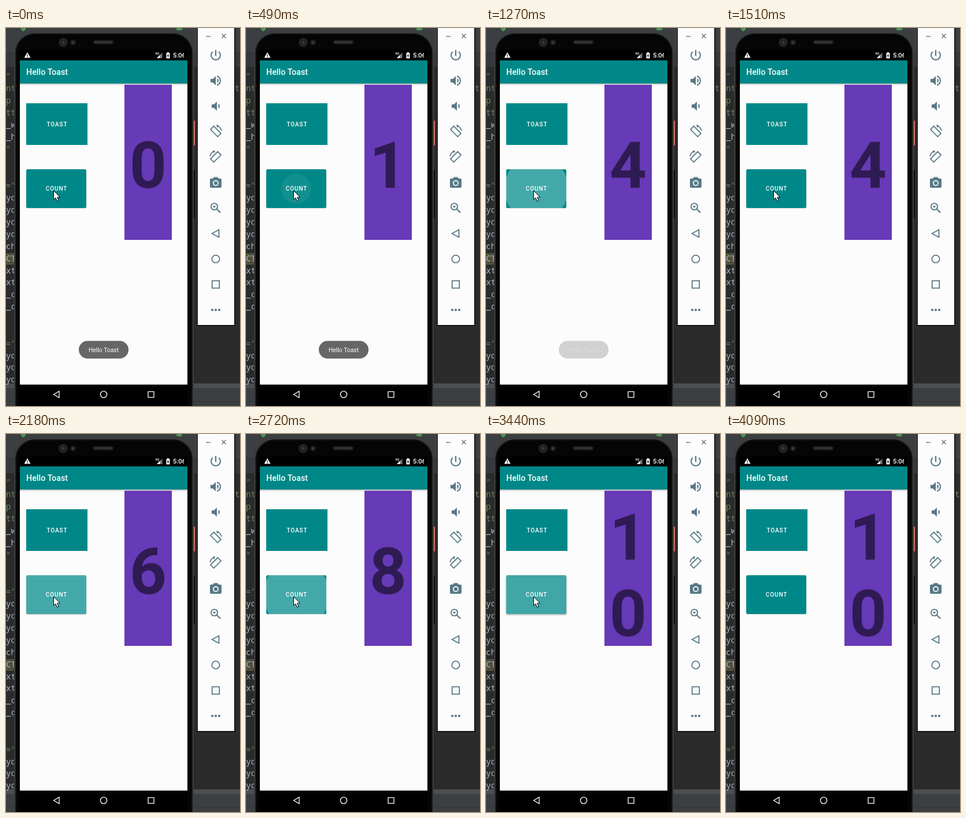
An HTML page with a canvas that plays this animation: 405 by 653 pixels, repeating every 4.52 s.

```html
<!DOCTYPE html>
<html lang="en">
<head>
<meta charset="utf-8">
<title>Counter app</title>
<style>
  html, body { margin: 0; width: 100%; height: 100%; overflow: hidden; background: #2b2b2b; }
  canvas { display: block; width: 405px; height: 653px; }
</style>
</head>
<body>
<canvas id="stage"></canvas>
<script>
const W = 405, H = 653, LOOP = 4520;
const canvas = document.getElementById('stage');
const dpr = window.devicePixelRatio || 1;
canvas.width = W * dpr;
canvas.height = H * dpr;
const g = canvas.getContext('2d');

const TEAL = '#008888', SLATE = '#587885', PAPER = '#fcfcfc';
const SANS = 'Roboto, sans-serif', MONO = '"Noto Sans Mono", monospace';

const TICKS = [0, 130, 250, 370, 490, 610, 760, 880, 1000, 1150, 1270, 1390, 1510, 1900, 2050, 2180,
  2300, 2450, 2600, 2720, 2840, 2960, 3080, 3200, 3320, 3440, 3560, 3700, 3820, 3940, 4090];
const TAPS = [100, 470, 745, 1140, 1800, 1990, 2310, 2580, 2860, 3190];
const COUNTS = [250, 610, 880, 1270, 1900, 2180, 2450, 2720, 2960, 3320];
const PATH = [[3440, 82, 281], [3560, 96, 298], [3700, 150, 440], [3820, 204, 570], [3940, 249, 625]];

const ramp = (v, a, b) => Math.min(1, Math.max(0, (v - a) / (b - a)));

function rect(x, y, w, h, color, r = 0) {
  g.fillStyle = color;
  g.beginPath();
  g.roundRect(x, y, w, h, r);
  g.fill();
}

function disc(x, y, r, color) {
  g.fillStyle = color;
  g.beginPath();
  g.arc(x, y, r, 0, 7);
  g.fill();
}

function ring(x, y, r, color, width = 2, from = 0, to = Math.PI * 2) {
  g.strokeStyle = color;
  g.lineWidth = width;
  g.beginPath();
  g.arc(x, y, r, from, to);
  g.stroke();
}

function poly(points, { fill, stroke, width = 2, close = true }) {
  g.beginPath();
  points.forEach(([x, y]) => g.lineTo(x, y));
  if (close) g.closePath();
  if (fill) { g.fillStyle = fill; g.fill(); }
  if (stroke) { g.strokeStyle = stroke; g.lineWidth = width; g.stroke(); }
}

function line(x1, y1, x2, y2, color, width = 2) {
  poly([[x1, y1], [x2, y2]], { stroke: color, width, close: false });
}

function label(str, x, y, font, color, align = 'left', spacing = 0) {
  g.font = font;
  g.fillStyle = color;
  g.textAlign = align;
  g.letterSpacing = spacing + 'px';
  g.fillText(str, x, y);
  g.letterSpacing = '0px';
}

function at(x, y, draw, flip = 1) {
  g.save();
  g.translate(x, y);
  g.scale(flip, 1);
  draw();
  g.restore();
}

function drawEditor() {
  rect(0, 0, W, H, '#2b2b2b');
  rect(0, 0, W, 42, '#3c3f41');
  rect(0, 42, W, 1, '#323232');
  rect(0, 43, W, 24, '#36393b');
  rect(0, 67, W, 1, '#323232');
  rect(0, 614, W, 8, '#4c4e50');
  rect(0, 622, W, 31, '#3c3f41');
  rect(0, 645, W, 1, '#323232');
  poly([[25, 0], [34, 0], [34, 3], [29, 6]], { fill: '#499c54' });
  rect(295, 0, 10, 4, '#499c54', 2);
  rect(0, 389, 14, 20, '#52503a');

  const code = {
    84: '"', 105: 'nt', 126: 'p', 147: 'tt', 168: '_w', 189: '_h', 210: '"',
    273: '="', 294: 'yo', 315: 'yo', 336: 'yo', 357: 'yo', 378: 'ch', 399: 'CT',
    420: 'xt', 440: 'xt', 461: '_c', 482: '_c', 546: '="', 567: 'yo', 587: 'yo', 608: 'yo'
  };
  for (const [y, str] of Object.entries(code)) {
    const green = /["p]|nt|tt/.test(str);
    label(str, 0, +y + 4, '14px ' + MONO, green ? '#6a8759' : '#a9b7c6');
  }
  label('tt', 396, 109, '14px ' + MONO, '#6a8759');
}

function drawPhone() {
  rect(324, 160, 3, 43, '#d9705f', 1);
  rect(324, 245, 3, 82, '#0c0c0c', 1);
  rect(14, 7, 311, 700, '#171717', 36);
  g.strokeStyle = '#4a4b4c';
  g.lineWidth = 1.5;
  g.beginPath();
  g.roundRect(15, 8, 309, 700, 35);
  g.stroke();
  rect(18, 11, 303, 700, '#050505', 32);

  disc(99, 25, 8, '#191b1e');
  ring(99, 25, 6, '#2b2d31', 1.5);
  disc(99, 25, 3, '#33363b');
  disc(116, 25, 5, '#1d1e21');
  disc(116, 25, 2, '#3a3c40');
  rect(151, 21, 35, 7, '#202020', 3.5);
  for (let x = 154; x < 184; x += 3) rect(x, 23, 1.5, 3, '#484848');

  rect(24, 38, 290, 615, '#000');
  rect(24, 96, 290, 520, PAPER);
}

function drawStatusBar() {
  poly([[37, 42], [42.5, 51.5], [31.5, 51.5]], { fill: '#fff' });
  rect(36.4, 45.5, 1.3, 3, '#000');
  rect(36.4, 49.3, 1.3, 1.2, '#000');
  label('4G', 258, 46, '500 6px ' + SANS, '#fff');
  poly([[270.5, 42.5], [270.5, 52], [261, 52]], { fill: '#777' });
  poly([[266.5, 46.5], [266.5, 52], [261, 52]], { fill: '#fff' });
  rect(277.5, 43, 6, 9.5, '#fff', 1);
  rect(279, 42, 3, 2, '#fff');
  poly([[281, 44.5], [278.7, 48.4], [280.2, 48.4], [280, 51.2], [282.3, 47.2], [280.8, 47.2]], { fill: '#000' });
  g.save();
  g.beginPath();
  g.rect(286, 38, 22, 18);
  g.clip();
  label('5:06', 289, 51, '500 11px ' + SANS, '#fff');
  g.restore();
}

function drawNavBar() {
  poly([[82.5, 633], [92, 627.5], [92, 638.5]], { stroke: '#fff', width: 1.3 });
  ring(169, 633, 5.6, '#fff', 1.4);
  poly([[246, 628.2], [256, 628.2], [256, 638.2], [246, 638.2]], { stroke: '#fff', width: 1.3 });
}

function speaker(x) {
  poly([[x, -3], [x + 4, -3], [x + 9, -8], [x + 9, 8], [x + 4, 3], [x, 3]], { fill: SLATE });
}

function wave(x, r, half) {
  ring(x, 0, r, SLATE, 2, -half, half);
}

function rotateIcon() {
  poly([[-3.5, -9.5], [9, 3], [3.5, 8.8], [-9, -3.7]], { stroke: SLATE, width: 1.8 });
  ring(0, 0, 10, SLATE, 1.8, -1.25, -0.15);
  poly([[1, -11.5], [5.5, -11], [2.5, -6.5]], { fill: SLATE });
}

function drawPanel() {
  rect(331, 0, 66, 515, '#161616');
  rect(332, 0, 63, 513, PAPER);
  const x = 363;
  line(346, 14.5, 354, 14.5, '#62727a', 1.3);
  line(373.5, 10.5, 380.5, 17.5, '#62727a', 1.5);
  line(380.5, 10.5, 373.5, 17.5, '#62727a', 1.5);

  at(x, 47, () => {
    line(0, -9, 0, 1, SLATE, 2.2);
    ring(0, 0, 8, SLATE, 2.1, -0.85, Math.PI + 0.85);
  });
  at(x, 91, () => {
    speaker(-9);
    g.fillStyle = SLATE;
    g.beginPath();
    g.arc(0.5, 0, 4.5, -1.1, 1.1);
    g.fill();
    wave(0, 8, 1.3);
  });
  at(x, 135, () => {
    speaker(-7);
    g.fillStyle = SLATE;
    g.beginPath();
    g.arc(2.5, 0, 4.5, -1.1, 1.1);
    g.fill();
  });
  at(x, 179, rotateIcon);
  at(x, 223, rotateIcon, -1);
  at(x, 267, () => {
    rect(-10, -7, 20, 16, SLATE, 2);
    poly([[-5.5, -6], [-3, -9.5], [3, -9.5], [5.5, -6]], { fill: SLATE });
    disc(0, 1, 5, PAPER);
    disc(0, 1, 3.2, SLATE);
  });
  at(x, 311, () => {
    ring(-2.5, -2.5, 5.6, SLATE, 1.9);
    line(1.8, 1.8, 8, 8, SLATE, 2.3);
    line(-5, -2.5, 0, -2.5, SLATE, 1.3);
    line(-2.5, -5, -2.5, 0, SLATE, 1.3);
  });
  at(x, 355, () => poly([[-6.5, 0], [5.5, -6.5], [5.5, 6.5]], { stroke: SLATE, width: 1.8 }));
  ring(x, 399, 6.7, SLATE, 1.8);
  at(x, 443, () => poly([[-6.3, -6.3], [6.3, -6.3], [6.3, 6.3], [-6.3, 6.3]], { stroke: SLATE, width: 1.8 }));
  for (const dx of [-6, 0, 6]) disc(x + dx, 487, 2.1, SLATE);
}

function shadowed(draw, color, blur, dy) {
  g.save();
  g.shadowColor = color;
  g.shadowBlur = blur * dpr;
  g.shadowOffsetY = dy * dpr;
  draw();
  g.restore();
}

function drawCountButton(t) {
  const ages = TAPS.map(p => t - p).filter(a => a >= 0 && a < 370);
  const lift = Math.max(0, ...ages.map(a => Math.min(ramp(a, 140, 330), 1 - ramp(a, 330, 370))));
  const body = () => rect(35, 244, 104, 67, TEAL, 2.5);
  shadowed(body, `rgba(0,0,0,${0.2 + 0.25 * lift})`, 1 + 4 * lift, 0.5 + 1.5 * lift);

  g.save();
  g.beginPath();
  g.roundRect(35, 244, 104, 67, 2.5);
  g.clip();
  for (const a of ages) {
    const alpha = 0.27 * ramp(a, 0, 75) * (1 - ramp(a, 240, 370));
    const radius = 18 + 46 * (1 - (1 - ramp(a, 0, 225)) ** 2);
    disc(87, 277.5, radius, `rgba(255,255,255,${alpha})`);
  }
  g.restore();
  label('COUNT', 87.5, 281.2, '500 10px ' + SANS, '#fff', 'center', 0.9);
}

function drawApp(t) {
  shadowed(() => rect(24, 56, 290, 40, TEAL), 'rgba(0,0,0,.35)', 3, 1);
  label('Hello Toast', 35, 81, '500 14.3px ' + SANS, '#fff');

  rect(35, 130, 106, 72, TEAL);
  label('TOAST', 88.5, 170, '500 10px ' + SANS, '#fff', 'center', 0.9);
  drawCountButton(t);

  rect(205, 98, 82, 268, '#673ab7');
  const count = COUNTS.filter(c => t >= c).length;
  const digits = String(count);
  const lines = digits.length > 1 ? [217, 349] : [276];
  lines.forEach((y, i) => label(digits[i], 246, y, 'bold 112px ' + SANS, '#2f1b53', 'center'));

  const fade = 1 - ramp(t, 970, 1390);
  if (fade > 0) {
    g.globalAlpha = fade;
    rect(126, 540.5, 86, 30.5, '#666', 15.2);
    label('Hello Toast', 169, 559.6, '10.3px ' + SANS, '#fff', 'center');
    g.globalAlpha = 1;
  }
}

function drawPointer(t) {
  if (t >= 4090) return;
  const next = PATH.findIndex(p => p[0] > t);
  let [x, y] = PATH[0].slice(1);
  if (next < 0) {
    [x, y] = PATH[PATH.length - 1].slice(1);
  } else if (next > 0) {
    const a = PATH[next - 1], b = PATH[next], k = ramp(t, a[0], b[0]);
    x = a[1] + (b[1] - a[1]) * k;
    y = a[2] + (b[2] - a[2]) * k;
  }
  at(x + 0.5, y, () => poly(
    [[0, 0], [0, 15.5], [3.5, 12.3], [6, 18.2], [8.7, 17], [6.2, 11.4], [11, 11.2]],
    { fill: '#fff', stroke: '#000', width: 1 }));
}

function frame(now) {
  const time = now % LOOP;
  const t = TICKS.filter(k => k <= time).pop();
  g.setTransform(dpr, 0, 0, dpr, 0, 0);
  drawEditor();
  drawPhone();
  drawApp(t);
  drawStatusBar();
  drawNavBar();
  drawPanel();
  drawPointer(t);
}

const start = performance.now();
function loop() {
  frame(performance.now() - start);
  requestAnimationFrame(loop);
}
loop();
</script>
</body>
</html>
```
